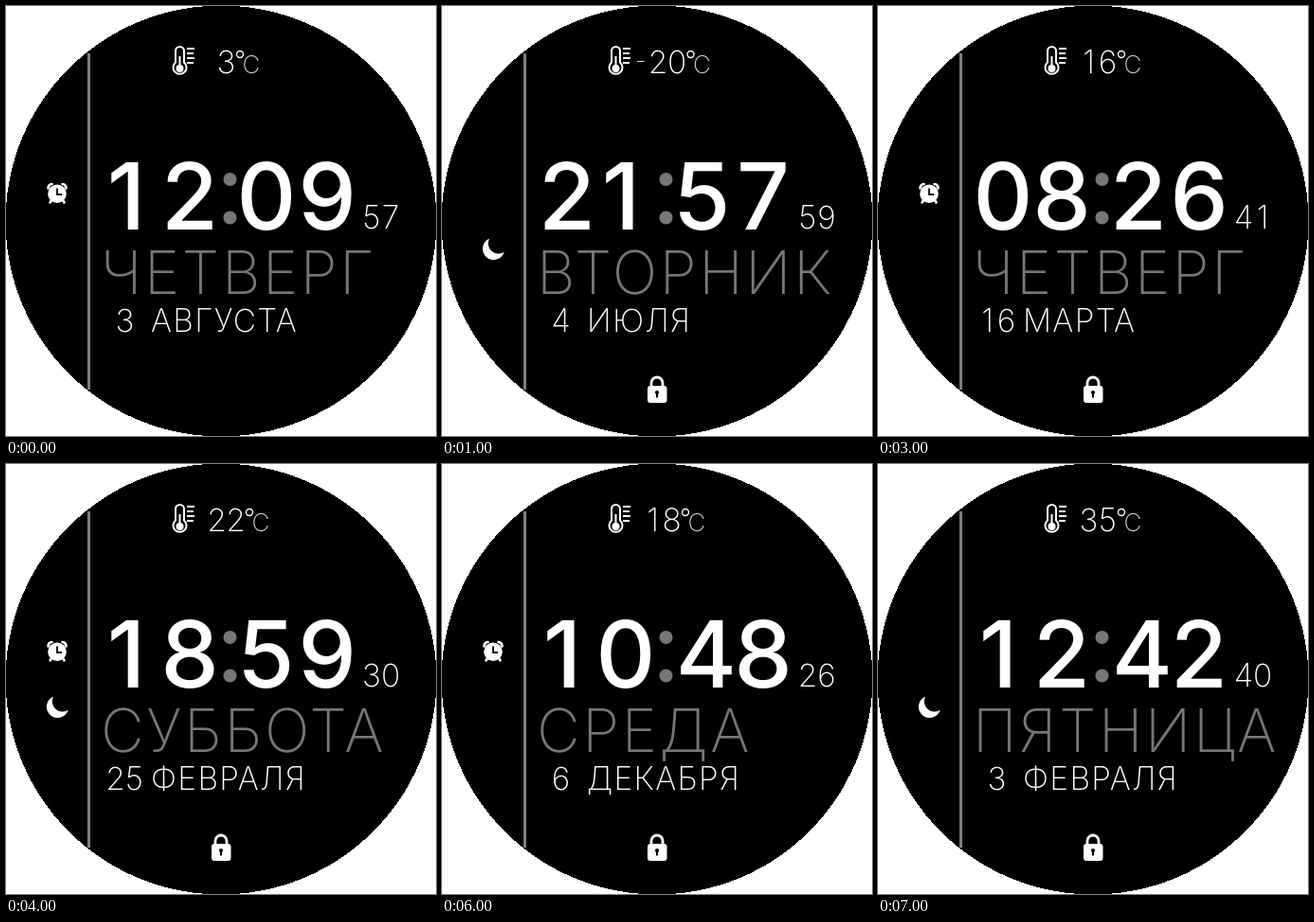
An HTML page that plays this animation: 454x454 px, repeating every 8000 ms.

```html
<!DOCTYPE html>
<html lang="ru">
<head>
<meta charset="utf-8">
<title>Циферблат</title>
<style>
  html, body { margin: 0; width: 100%; height: 100%; overflow: hidden; background: #fff; }
  svg { display: block; width: 454px; height: 454px; }
  text { font-family: Inter, sans-serif; fill: #fff; }
  .big { font-size: 98px; font-weight: 500; text-anchor: middle; }
  .small { font-size: 33.5px; font-weight: 250; }
  .mid { text-anchor: middle; }
  .minus { font-family: Roboto, sans-serif; }
  .month { letter-spacing: 1.3px; }
  .day { font-size: 63px; font-weight: 200; letter-spacing: 2.6px; fill: #777; }
  .unit { font-size: 26px; font-weight: 200; fill: #ccc; }
  .face {
    visibility: hidden;
    animation: show 8s steps(1) infinite;
    animation-delay: calc((var(--i) - 8) * 1s);
  }
  @keyframes show {
    0% { visibility: visible; }
    12.5%, 100% { visibility: hidden; }
  }
</style>
</head>
<body>
<svg viewBox="0 0 454 454">
  <defs>
    <g id="alarm">
      <g fill="none" stroke="#fff" stroke-width="2.6" stroke-linecap="round">
        <path d="M44.5 192.5q0-4 4-4.5M63.5 192.5q0-4-4-4.5M48 205L46.5 207.5M60 205L61.5 207.5"/>
      </g>
      <circle cx="54" cy="198.3" r="9.8" fill="#fff"/>
      <path d="M54 192.5V199H59" fill="none" stroke="#000" stroke-width="1.8"/>
    </g>
    <path id="moon" fill="#fff" d="M50 245.5A11.7 11.7 0 1 0 65.7 259.8A11 11 0 0 1 50 245.5Z"/>
    <g id="lock">
      <path d="M221 404V398a6 6 0 0 1 12 0V404" fill="none" stroke="#fff" stroke-width="2.8"/>
      <rect x="217" y="401" width="20.5" height="18" rx="3" fill="#fff"/>
      <circle cx="227" cy="408" r="2.1"/>
      <path d="M227 408V413.5" stroke="#000" stroke-width="2"/>
    </g>
  </defs>

  <circle cx="227" cy="227" r="227.5" shape-rendering="crispEdges"/>
  <rect x="86" y="50" width="3" height="355" fill="#808080"/>

  <g fill="none" stroke="#fff" stroke-width="2">
    <path d="M179 59.5V47.5a4.5 4.5 0 0 1 9 0V59.5a7 7 0 1 1-9 0Z"/>
    <path d="M183.5 53V66"/>
    <path d="M191 45H199M191 50H198M191 55H199M191 60H198"/>
  </g>
  <circle cx="183.5" cy="66" r="4" fill="#fff"/>

  <g fill="#777">
    <circle cx="236.5" cy="183" r="7"/>
    <circle cx="236.5" cy="223.5" r="7"/>
  </g>
  <g id="faces"></g>
</svg>

<script>
  // time, seconds, temperature, weekday, date, month, icons
  const states = [
    ["1209", "57", 3, "ЧЕТВЕРГ", 3, "АВГУСТА", "alarm"],
    ["2157", "59", -20, "ВТОРНИК", 4, "ИЮЛЯ", "moon lock"],
    ["1514", "38", -1, "СУББОТА", 12, "АВГУСТА", "alarm"],
    ["0826", "41", 16, "ЧЕТВЕРГ", 16, "МАРТА", "alarm lock"],
    ["1859", "30", 22, "СУББОТА", 25, "ФЕВРАЛЯ", "alarm moon lock"],
    ["2133", "03", -9, "СРЕДА", 24, "МАЯ", "moon"],
    ["1048", "26", 18, "СРЕДА", 6, "ДЕКАБРЯ", "alarm lock"],
    ["1242", "40", 35, "ПЯТНИЦА", 3, "ФЕВРАЛЯ", "moon lock"]
  ];
  const cells = [132, 194, 275, 339];
  const nudge = { 1: -5, 4: 4 };
  const step = 20;

  const label = (cls, x, y, s) => `<text class="${cls}" x="${x}" y="${y}">${s}</text>`;

  // Small digits sit in equal cells; x is the centre of the last one.
  const digits = (s, x, y) => [...s].reverse()
    .map((d, k) => label("small mid", x - step * k, y, d)).join("");

  function face([time, sec, temp, day, date, month, icons], i) {
    const value = String(Math.abs(temp));
    const num = String(date);
    const below = temp < 0;
    const deg = 237 + 10 * value.length + 5.5 * below;
    return `<g class="face" style="--i:${i}">` +
      [...time].map((d, k) => label("big", cells[k] + (nudge[d] || 0), 236, d)).join("") +
      digits(sec, 406, 235) +
      (below ? label("small mid minus", deg - 12.5 - step * value.length, 69, "-") : "") +
      digits(value, deg - 14.5, 71) +
      `<circle cx="${deg}" cy="51" r="3.5" fill="none" stroke="#fff" stroke-width="1.4"/>` +
      label("unit", deg + 2.5, 71, "C") +
      label("day", 100, 304, day) +
      digits(num, 115.5 + 10 * num.length, 344) +
      label("small month", 153, 344, month) +
      icons.split(" ").map(id => `<use href="#${id}"/>`).join("") +
      "</g>";
  }

  document.getElementById("faces").innerHTML = states.map(face).join("");
</script>
</body>
</html>
```
